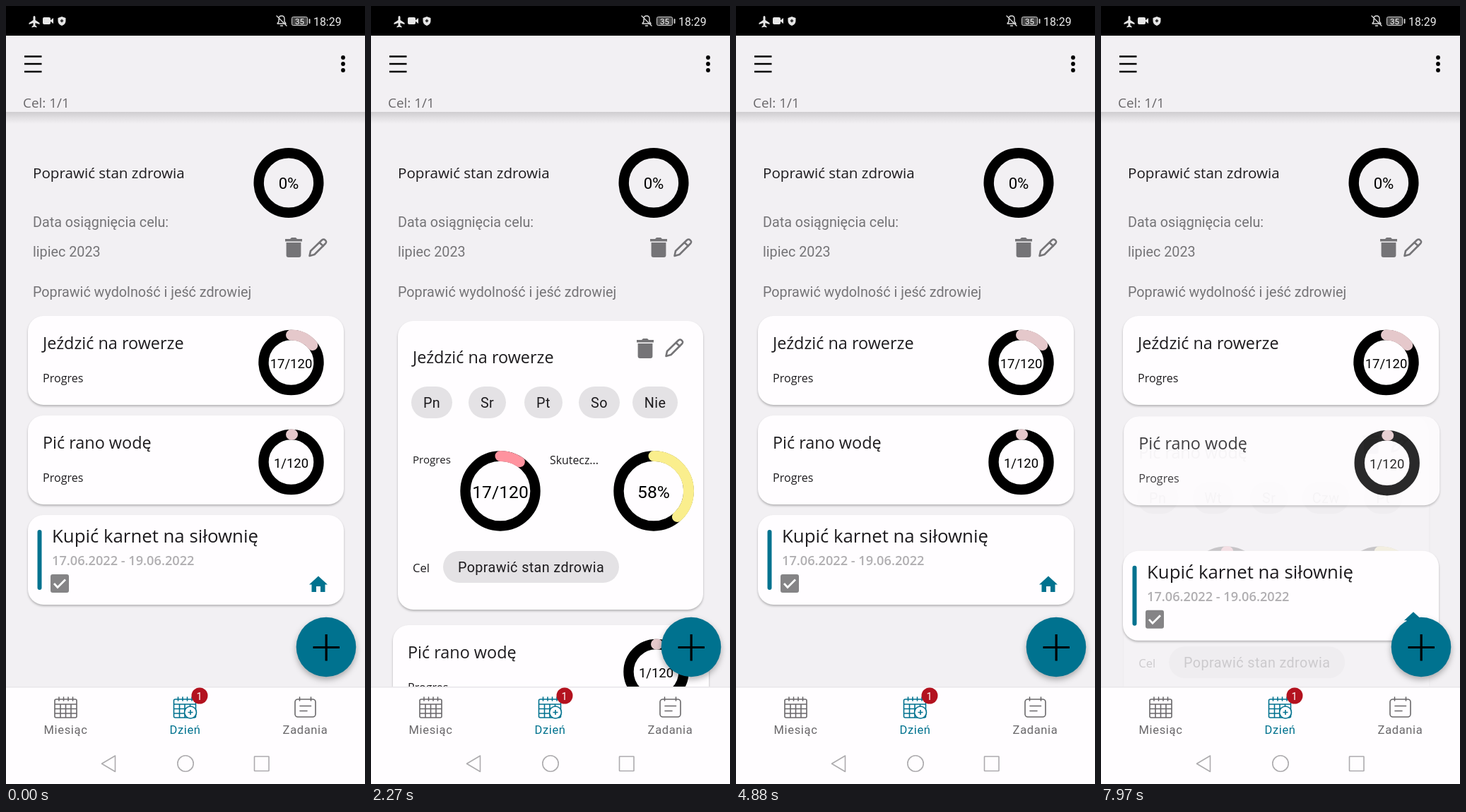
Write an HTML page that moves like this. It is 508 by 1102 pixels and loops after 8 s.

```html
<!DOCTYPE html>
<html lang="pl">
<head>
<meta charset="utf-8">
<title>Cele</title>
<style>
@property --a { syntax: "<number>"; inherits: true; initial-value: 0; }
@property --b { syntax: "<number>"; inherits: true; initial-value: 0; }
html, body { margin: 0; width: 100%; height: 100%; overflow: hidden; background: #f2f0f3; }
svg {
  display: block; width: 100vw; height: 100vh;
  animation: openA 8s infinite, openB 8s infinite;
}
text { font-family: Roboto, sans-serif; white-space: pre; }
.h { font-family: "Open Sans", "Noto Sans", sans-serif; font-weight: 500; }
.card { fill: #fffdff; filter: drop-shadow(0 2px 1.5px rgba(0, 0, 0, .25)); }
.line { fill: none; stroke-width: 1.6; stroke-linecap: round; stroke-linejoin: round; }

/* --a and --b: how far the first and second card are open */
#listA { opacity: calc(1 - var(--a)); transform: translate(calc(var(--a) * 7px), calc(var(--a) * 7px)); }
#fullA { opacity: var(--a); transform-origin: 38px 446px; transform: scale(calc(.974 + var(--a) * .026)); }
#below, #clipA { transform: translateY(calc(var(--a) * 297px)); }
#listB { opacity: calc(1 - var(--b)); transform: translate(calc(var(--b) * 7px), calc(var(--b) * 7px)); }
#fullB { opacity: var(--b); transform: translate(calc(var(--b) * 7px - 7px), calc(var(--b) * 7px + 134px)); }
#task { transform: translateY(calc(var(--b) * 297px)); }

@keyframes openA {
  0% { --a: 0; }
  19.15% { --a: 0; animation-timing-function: cubic-bezier(.4, 0, .2, 1); }
  22.5%, 57.4% { --a: 1; animation-timing-function: cubic-bezier(.4, 0, .2, 1); }
  60.75%, 100% { --a: 0; }
}
/* the loop cuts this opening short, so the curve is its first part only */
@keyframes openB {
  0% { --b: 0; }
  98.9% { --b: 0; animation-timing-function: cubic-bezier(.555, 0, .75, .467); }
  99.94%, 100% { --b: .396; }
}
.fill { animation: fill 8s linear infinite; }
@keyframes fill {
  0%, 20.15% { stroke-dasharray: 0 999; }
  32.65%, 100% { stroke-dasharray: var(--deg) 999; }
}
#glow { animation: glow 8s linear infinite; }
@keyframes glow {
  0%, 73% { opacity: 0; }
  76%, 77% { opacity: 1; }
  81.5%, 100% { opacity: 0; }
}
#touch { animation: drag 8s linear infinite, show 8s step-end infinite; }
@keyframes drag {
  0%, 72.4% { transform: translate(300px, 690px); }
  76.125% { transform: translate(357px, 530px); }
  77%, 100% { transform: translate(365px, 505px); }
}
@keyframes show {
  0% { opacity: 0; }
  72.4% { opacity: 1; }
  77% { opacity: 0; }
}
</style>
</head>
<body>
<script>
const TEAL = '#00728f', GREY = '#757477', INK = '#1d1b1e';

const text = (x, mid, size, str, fill = INK, attrs = '') =>
  `<text x="${x}" y="${mid + size * .355}" font-size="${size}" fill="${fill}" ${attrs}>${str}</text>`;
const head = (x, mid, size, str, fill = INK, attrs = '') =>
  text(x, mid, size, str, fill, 'class="h" ' + attrs);
const centre = (x, mid, size, str, fill, attrs = '') =>
  text(x, mid, size, str, fill, 'text-anchor="middle" ' + attrs);
const rect = (x, y, w, h, r, attrs) =>
  `<rect x="${x}" y="${y}" width="${w}" height="${h}" rx="${r}" ${attrs}/>`;
const path = (d, attrs) => `<path d="${d}" ${attrs}/>`;

function ring(x, y, r, label, size, deg, color, grows) {
  const arc = deg ? `<circle r="${r}" transform="rotate(-90)" pathLength="360" stroke="${color}"
    stroke-width="15" stroke-linecap="round" stroke-dasharray="${deg} 999"
    ${grows ? `class="fill" style="--deg:${deg}"` : ''}/>` : '';
  return `<g transform="translate(${x} ${y})" fill="none">
    <circle r="${r}" stroke="#000" stroke-width="14.4"/>${arc}
    ${centre(0, 1, size, label, '#000')}</g>`;
}

const trash = (x, y) => path(`M${x} ${y + 2}h7l2-2h6l2 2h7v3.4h-24z
  M${x + 1.6} ${y + 7}h20.8v18q0 3-3 3h-14.800q-3 0-3-3z`, `fill="${GREY}"`);

const pencil = (x, y) => path(`M${x + 1.5} ${y + 25}l1.500-7L${x + 19} ${y + 2.500}q2.500-2 4.500 0
  q3 2.500 .5 5L${x + 8.500} ${y + 23}zM${x + 15.500} ${y + 6}l5.500 5`,
  `class="line" stroke="${GREY}" style="stroke-width:2.6"`);

const habit = (y, name, label, deg) =>
  rect(31, y, 447, 126, 22, 'class="card"') + head(52, y + 39, 23.4, name) +
  head(52, y + 88, 16.1, 'Progres') + ring(403.5, y + 66, 39, label, 18.5, deg, '#e5c8cb');

const chip = (x, y, w, str) => rect(x, y, w, 45, 22.5, 'fill="#e4e2e5"') +
  centre(x + w / 2, y + 22.5, 19.76, str, INK, 'letter-spacing=".4"');

const details = (name, days, label, deg, rate) =>
  rect(38, 446, 432, 409, 22, 'class="card"') + head(59, 498, 23.4, name) +
  trash(376, 471) + pencil(416, 471) +
  days.map(([x, w, day]) => chip(x, 539, w, day)).join('') +
  head(59, 643, 15.1, 'Progres') + head(253, 643, 15.9, 'Skutecz...') +
  ring(183, 687, 49.5, label, 24.7, deg, '#ff939f', true) +
  ring(400, 687, 49.5, rate + '%', 24.7, rate * 3.6, '#faee8d', true) +
  head(59, 796, 16.6, 'Cel') + chip(102, 772, 249, 'Poprawić stan zdrowia');

const task = () =>
  rect(31, 721, 447, 127, 22, 'class="card"') + rect(44.5, 742, 6, 85, 3, `fill="${TEAL}"`) +
  head(65, 751, 25.8, 'Kupić karnet na siłownię') +
  head(65, 786, 18.2, '17.06.2022 - 19.06.2022', '#b0aeb1', 'style="font-weight:600"') +
  rect(63, 805, 26, 26, 3, 'fill="#858486"') +
  path('M68 818l5 5.500 11-11', 'fill="none" stroke="#fff" stroke-width="2.800"') +
  path('M442 807.500l13 12h-3.500v10.500h-6.500v-8h-6v8h-6.500v-10.500h-3.500z', `fill="${TEAL}"`);

const goal = () =>
  head(38, 237, 20.6, 'Poprawić stan zdrowia') + ring(400, 250.5, 42.3, '0%', 22.2) +
  text(38, 306, 19.76, 'Data osiągnięcia celu:', GREY) + text(38, 348, 19.76, 'lipiec 2023', GREY) +
  trash(395, 328) + pencil(428, 329) +
  text(38, 405, 19.76, 'Poprawić wydolność i jeść zdrowiej', GREY);

function calendar(x, color) {
  return path(`M${x + 2} 982h27q2 0 2 2v22q0 2-2 2h-27q-2 0-2-2v-22q0-2 2-2z
    M${x} 989h31M${x} 995.500h31M${x} 1002h31M${x + 8} 989v19M${x + 15.500} 989v19M${x + 23} 989v19
    M${x + 6} 979v5M${x + 12.500} 979v5M${x + 19} 979v5M${x + 25.500} 979v5`,
    `class="line" stroke="${color}"`);
}

const statusBar = () => rect(0, 0, 508, 42, 0, '') +
  `<g fill="#e6e6e6">` +
  path('M40 14q1.500 0 1.500 2v4l6 4v2l-6-2v3.500l2 1.500v1.500l-3.500-1-3.500 1v-1.500l2-1.500v-3.500l-6 2v-2l6-4v-4q0-2 1.500-2z', '') +
  rect(52, 16, 11, 10, 2, '') + path('M62 21l5-4v8z', '') +
  path('M79 15l5.500 2v4q0 5-5.500 7q-5.500-2-5.500-7v-4z', '') + '</g>' +
  path('M79 18.500l2.500 2.500-2.500 2.500-2.500-2.500z', 'fill="#333"') +
  path('M384 25h12l-2-3v-4q0-4-4-4t-4 4v4zM388.500 28h3M383 14l14 14',
    'class="line" stroke="#ddd" style="stroke-width:1.400"') +
  rect(404.5, 15.5, 22, 12, 2, 'fill="#444" stroke="#ccc"') + rect(428.5, 18, 2, 7, 1, 'fill="#ccc"') +
  centre(415.5, 21.5, 11.5, '35', '#fff') + text(435, 22, 15.9, '18:29', '#eee');

const header = () =>
  rect(0, 150, 508, 17, 0, 'fill="url(#shade)"') +
  path('M26 71.500h24.500M26 82h24.500M26 93h24.500', 'stroke="#000" stroke-width="2.700"') +
  [73, 82, 91].map(y => `<circle cx="477" cy="${y}" r="2.900"/>`).join('') +
  head(24, 137.5, 18.9, 'Cel: 1/1', '#6a686b');

const plusButton = () =>
  `<circle cx="453" cy="908" r="42.300" fill="${TEAL}" style="filter:drop-shadow(0 4px 4px rgba(0,0,0,.3))"/>` +
  path('M434.500 908.500h37.500M453.200 890v37.500', 'stroke="#000" stroke-width="3.200"');

function tabs() {
  const label = (x, str, color) => centre(x, 1025, 16.5, str, color, 'letter-spacing=".65"');
  return rect(0, 964, 508, 138, 0, 'fill="#fffdff"') + rect(0, 964, 508, 1.5, 0, 'fill="#e8e6e9"') +
    calendar(69, '#69676a') + calendar(237.500, TEAL) +
    `<circle cx="261" cy="1000.500" r="8.500" fill="#fffdff" stroke="${TEAL}" stroke-width="1.600"/>` +
    path('M257.500 1000.500h7M261 997v7', `stroke="${TEAL}" stroke-width="1.600"`) +
    '<circle cx="274" cy="977" r="11.500" fill="#b3121f"/>' + centre(273.5, 977.5, 14.5, '1', '#fff') +
    rect(409, 982, 29, 25, 4, 'class="line" stroke="#69676a"') +
    path('M415.500 979v5M431.500 979v5M416 991.500h15.500M416 998.500h10', 'class="line" stroke="#69676a"') +
    label(84.5, 'Miesiąc', '#69676a') + label(253.5, 'Dzień', TEAL) + label(423.5, 'Zadania', '#69676a') +
    `<g class="line" stroke="#adabae">` + path('M154.500 1062v22.500l-19-11.200z', '') +
    '<circle cx="254" cy="1073" r="11.200"/>' + rect(351.5, 1063, 20.5, 20.5, .5, '') + '</g>';
}

const daysA = [[57, 58, 'Pn'], [138, 53, 'Sr'], [217, 54, 'Pt'], [294, 58, 'So'], [370, 64, 'Nie']];
const daysB = [[57, 58, 'Pn'], [136, 57, 'Wt'], [217, 53, 'Sr'], [291, 66, 'Czw'], [378, 54, 'Pt']];

document.body.innerHTML = `<svg viewBox="0 0 508 1102" preserveAspectRatio="none">
  <defs>
    <linearGradient id="shade" x2="0" y2="1">
      <stop stop-color="#cfcdd0"/><stop offset=".5" stop-color="#e2e0e3"/><stop offset="1" stop-color="#f2f0f3"/>
    </linearGradient>
    <clipPath id="cut"><rect id="clipA" y="-400" width="508" height="973"/></clipPath>
  </defs>
  ${goal()}
  <g clip-path="url(#cut)"><g id="fullA">${details('Jeździć na rowerze', daysA, '17/120', 51, 58)}</g></g>
  <g id="listA">${habit(439, 'Jeździć na rowerze', '17/120', 51)}</g>
  <g id="below">
    <g id="fullB">${details('Pić rano wodę', daysB, '1/120', 3, 58)}</g>
    <g id="listB">${habit(580, 'Pić rano wodę', '1/120', 3)}</g>
    <g id="task">${task()}</g>
  </g>
  <g id="glow" fill="${TEAL}">
    ${path('M24 178h14q50 462 0 784h-14z', 'opacity=".035"')}
    ${path('M24 965v-3q276-57 461-24v27z', 'opacity=".09"')}
  </g>
  ${plusButton()}${header()}${statusBar()}${tabs()}
  <g id="touch"><circle r="15.500" fill="#eeeef2" fill-opacity=".85" stroke="#c4c8d8" stroke-width="2"/></g>
</svg>`;
</script>
</body>
</html>
```
